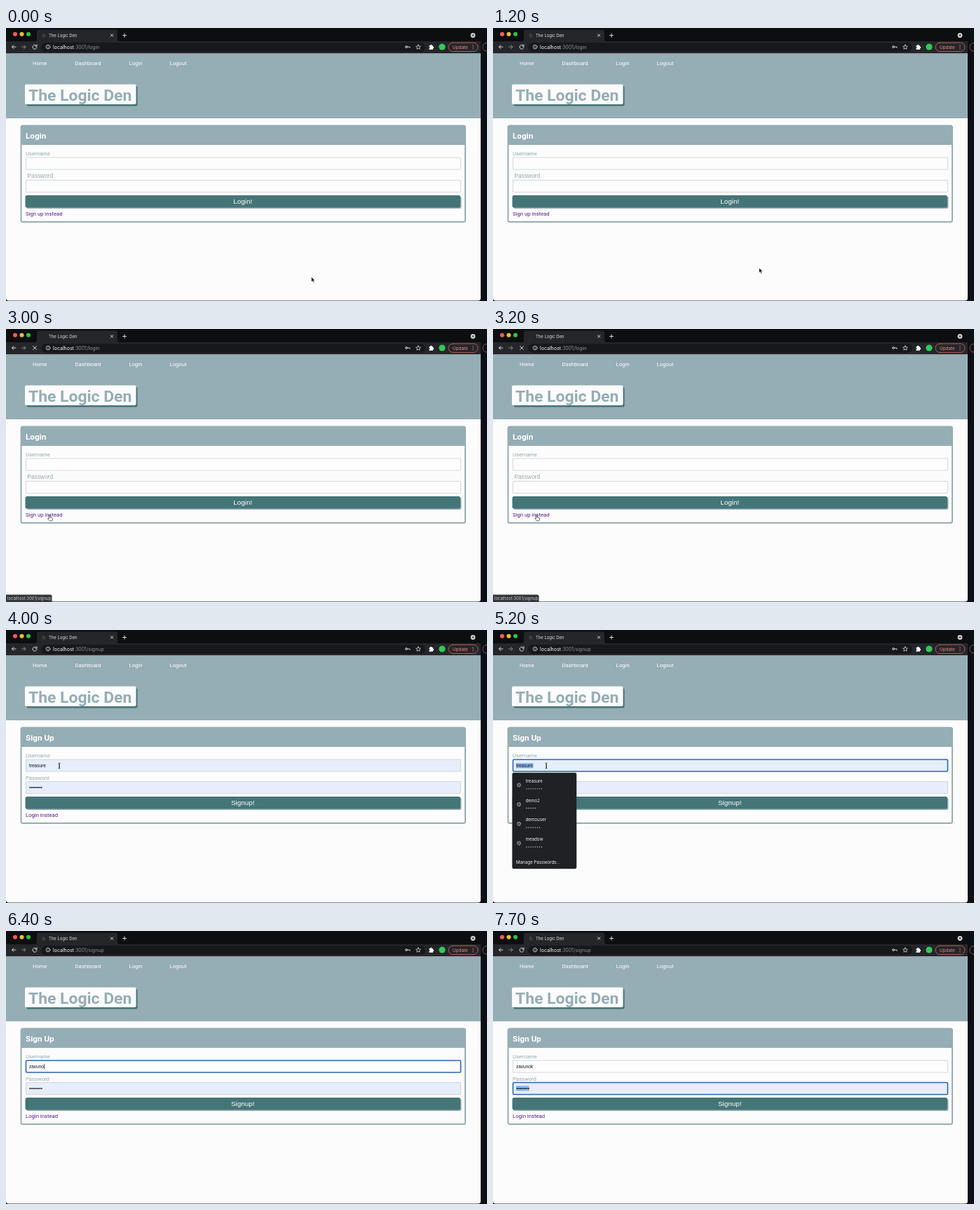
These frames come from a looping animation (686x390 px, 8000 ms). An HTML page:

```html
<!DOCTYPE html>
<html lang="en">
<head>
<meta charset="utf-8">
<title>The Logic Den</title>
<style>
  html, body { margin: 0; width: 100%; height: 100%; overflow: hidden; background: #0b0f15; }
  svg { display: block; width: 100%; height: 100%; }
  text { white-space: pre; }
  .ui { font-family: Inter, Roboto, sans-serif; }
  .page { font: 7.7px Roboto, "Open Sans", sans-serif; }
  .form { font: 6.5px "Liberation Sans", sans-serif; fill: #111; }
  .title { font-weight: 700; font-size: 22.9px; fill: #95adb5; }
  .heading { font-weight: 700; font-size: 11.7px; fill: #fff; }
  .label { fill: #93abb3; }
  .link { fill: #551a8b; }
  .button { font: 9.9px "Liberation Sans", sans-serif; fill: #fff; text-anchor: middle; }
  .icon { fill: none; stroke: #d5d7da; stroke-width: 1; stroke-linecap: round; stroke-linejoin: round; }
  .pointer { stroke: #fff; stroke-width: .6; fill: #000; }
</style>
</head>
<body>
<svg viewBox="0 0 686 390" preserveAspectRatio="none">
  <!-- browser window -->
  <rect width="677" height="40" fill="#0d0e10"/>
  <path d="M0 36H677V386Q677 389.500 673 389.500H4Q0 389.500 0 386Z" fill="#fcfcfc"/>
  <path d="M41 19Q44 19 44 16V5.500Q44 2.500 47 2.500H156Q159 2.500 159 5.500V16Q159 19 162 19H677V36.500H0V19Z" fill="#25262a"/>
  <rect x="50" y="21" width="548" height="13" rx="6.500" fill="#17181b"/>
  <circle cx="13" cy="8.800" r="3" fill="#fc5b57"/>
  <circle cx="22.500" cy="8.800" r="3" fill="#f5bd2f"/>
  <circle cx="32" cy="8.800" r="3" fill="#2ac840"/>
  <g class="ui">
    <text x="61" y="12.700" font-size="5.900" fill="#dfe1e5">The Logic Den</text>
    <text x="67" y="29.500" font-size="7" fill="#8f9398"><tspan fill="#fff">localhost</tspan>:3001/<tspan id="path"></tspan></text>
    <text x="637" y="29.600" font-size="6.300" fill="#f28b82">Update</text>
  </g>
  <path data-show="0-2900 3300-8000" d="M51.500 8h3l2 2v3.500h-5z" fill="#3b3d41"/>
  <g class="icon">
    <path d="M149.300 8.800l3.400 3.400m0-3.400l-3.400 3.400M166.500 10.500h5M169 8v5"/>
    <path d="M14 27H8.500m2.500-2.500L8.500 27l2.500 2.500"/>
    <path d="M22.500 27H28m-2.500-2.500L28 27l-2.500 2.500" stroke="#85888d"/>
    <path data-show="0-2900 3300-8000" d="M43.300 25.200A3 3 0 1 0 44 27.600M44 23.800v2.300h-2.300"/>
    <path data-show="2900-3300" d="M38.500 24.500l5 5m0-5l-5 5"/>
    <circle cx="60" cy="27" r="2.900" stroke-width=".8"/>
    <path d="M60 26.800v1.700M60 25.400v.1" stroke-width=".8"/>
    <circle cx="571" cy="27" r="1.400"/>
    <path d="M572.500 27h3.500v1.300"/>
    <path d="M588 23.800l1 2.200 2.400.2-1.800 1.600.5 2.400-2.100-1.300-2.100 1.300.5-2.400-1.800-1.600 2.400-.2z" stroke-width=".8"/>
    <rect x="631" y="21" width="42" height="12.500" rx="6.200" stroke="#c8605b" stroke-width=".9"/>
    <path d="M686 21.500h-1a5.800 5.800 0 0 0 0 11.500h1" stroke="#8b4845"/>
    <path d="M666 24.700v.1m0 2.400v.1m0 2.400v.1" stroke="#f28b82" stroke-width="1.200"/>
  </g>
  <path d="M603.500 25h1.500a1.200 1.200 0 0 1 2.400 0h1.600v1.700a1.200 1.200 0 0 1 0 2.400v1.700h-5.500v-2a1 1 0 0 0 0-2z" fill="#fff"/>
  <circle cx="622" cy="27" r="4.600" fill="#35c759"/>
  <circle cx="666" cy="10.500" r="3.400" fill="#c8cacd"/>
  <path d="M664.300 9.700h3.400l-1.700 2z" fill="#17181b"/>

  <!-- site header -->
  <rect y="36.500" width="677" height="92.500" fill="#95adb5"/>
  <g class="page" fill="#fff">
    <text x="38" y="52.500">Home</text>
    <text x="98.500" y="52.500">Dashboard</text>
    <text x="175.500" y="52.500">Login</text>
    <text x="233.500" y="52.500">Logout</text>
  </g>
  <rect x="29.500" y="83" width="158" height="28.500" rx="2" fill="#447577"/>
  <rect x="27" y="80.500" width="158.500" height="28.500" rx="2" fill="#fcfcfc"/>
  <text class="page title" x="32" y="103.500">The Logic Den</text>

  <!-- form card -->
  <rect id="card" x="21.500" y="139.500" width="633.500" rx="2.500" fill="#fcfcfc" stroke="#95adb5" stroke-width="2"/>
  <path d="M21 167V141.500Q21 139 23.500 139H653Q655.500 139 655.500 141.500V167Z" fill="#95adb5"/>
  <g class="page">
    <text class="heading" id="heading" x="28" y="157.600"></text>
    <text class="label" x="28" y="182">Username</text>
    <text class="label" id="passwordLabel" y="213.700">Password</text>
  </g>
  <rect id="userField" x="28.500" y="185" width="620" height="17"/>
  <rect id="passField" x="28.500" width="620" height="17"/>
  <rect data-show="5200-5700" x="33" y="190" width="24.500" height="7.500" fill="#8db9f3"/>
  <rect data-show="7200-8000" x="33" y="221" width="18.500" height="7.500" fill="#8db9f3"/>
  <text class="form" id="userText" x="33" y="195.800"></text>
  <rect id="caret" y="190" width=".7" height="7.200" fill="#111"/>
  <g id="passDots" data-show="3500-8000" fill="#111"></g>
  <g id="buttonGroup">
    <rect x="29" y="240.500" width="620.500" height="17.500" rx="2.500" fill="#95adb5"/>
    <rect id="buttonFace" x="27.500" y="239" width="620.500" height="17.500" rx="2.500"/>
    <text class="button" id="buttonText" x="337.700" y="251.300"></text>
    <text class="page link" id="switchLink" x="28" y="267.700"></text>
  </g>

  <!-- saved password menu -->
  <g data-show="5200-5700">
    <rect x="27.500" y="204" width="91.500" height="137" rx="2" fill="#202124" stroke="#3a3b3f" stroke-width=".4"/>
    <g id="menu" class="ui" font-size="6.200" fill="#f1f3f4">
      <text x="33" y="333.800">Manage Passwords...</text>
    </g>
  </g>

  <!-- status bubble -->
  <g data-show="2800-3700" class="ui">
    <path d="M0 379.500H63Q65.500 379.500 65.500 382V390H0Z" fill="#34363a"/>
    <text x="2" y="387" font-size="6" fill="#c5c8cc">localhost:3001/signup</text>
  </g>

  <g id="mouse">
    <path class="pointer" data-show="0-2300" d="M0 0V7.200L1.700 5.700 2.900 8.300 4.200 7.700 3 5.200H5.200Z"/>
    <path class="pointer" data-show="2300-3400" style="fill:#fff;stroke:#111" d="M-.8 0Q0-1 .7 0V3l3 .7q.8.300.7 1.300L3.700 8H.2L-2 5.200q-.3-1 .5-1L-.8 5Z"/>
    <path data-show="3400-5700" d="M-1.500-4Q0-4 0-3V3Q0 4-1.500 4M1.500-4Q0-4 0-3V3Q0 4 1.500 4" fill="none" stroke="#222" stroke-width=".8"/>
  </g>
</svg>
<script>
const DURATION = 8000;
const byId = id => document.getElementById(id);
const setAttrs = (el, attrs) => {
  for (const [name, value] of Object.entries(attrs)) el.setAttribute(name, value);
};
const dots = (count, x, y, gap, r) => Array.from({ length: count },
  (_, i) => `<circle cx="${x + i * gap}" cy="${y}" r="${r}"/>`).join('');

const accounts = [['treasure', 8], ['demo2', 5], ['demouser', 7], ['meadow', 8]];
byId('menu').innerHTML += accounts.map(([name, length], i) => {
  const y = 218 + i * 27.7;
  return `<text x="46.500" y="${y}">${name}</text>${dots(length, 48, y + 8.8, 3.05, .65)}
    <circle cx="37" cy="${y + 3.5}" r="2.600" fill="none" stroke="#a8abb0" stroke-width=".8"/>
    <path d="M35 ${y + 2.5}l2 1 .5 2.300M37.500 ${y + 1.2}l.5 1.500 1.300.6" fill="none" stroke="#a8abb0" stroke-width=".8"/>`;
}).join('');
byId('passDots').innerHTML = dots(8, 34.3, 225, 2.35, .95);

const timed = [...document.querySelectorAll('[data-show]')].map(el => ({
  el, spans: el.dataset.show.split(' ').map(span => span.split('-').map(Number))
}));

// Pointer stops: time, x, y
const stops = [[0, 435.5, 355.5], [1000, 435.5, 355.5], [1800, 80, 274], [2000, 64, 255],
  [2150, 64, 255], [2400, 62, 266], [3300, 62, 266], [3900, 76, 194], [8000, 76, 194]];
const typed = 'zavunok';
const keyTimes = [5700, 5900, 6100, 6200, 6300, 6400, 6800];

function pointerAt(t) {
  const i = stops.findIndex(stop => stop[0] > t);
  const [t0, x0, y0] = stops[i - 1], [t1, x1, y1] = stops[i];
  const p = (t - t0) / (t1 - t0), eased = p * p * (3 - 2 * p);
  return [x0 + (x1 - x0) * eased, y0 + (y1 - y0) * eased];
}

function styleField(id, focused, filled) {
  setAttrs(byId(id), {
    fill: filled ? '#e6eefc' : '#fdfdfd',
    stroke: focused ? '#2864b8' : '#c9cdd1',
    'stroke-width': focused ? 1.6 : .8,
    rx: focused ? 1.5 : .3
  });
}

function draw(t) {
  const signup = t >= 3300, autofilled = t >= 3500, typing = t >= keyTimes[0];
  const userFocused = t >= 5200 && t < 7200;

  for (const { el, spans } of timed) {
    el.style.display = spans.some(([from, to]) => t >= from && t < to) ? '' : 'none';
  }

  byId('path').textContent = signup ? 'signup' : 'login';
  byId('heading').textContent = signup ? 'Sign Up' : 'Login';
  byId('buttonText').textContent = signup ? 'Signup!' : 'Login!';
  byId('switchLink').textContent = signup ? 'Login instead' : 'Sign up instead';
  byId('card').setAttribute('height', signup ? 136.5 : 137.5);
  byId('passField').setAttribute('y', signup ? 216.5 : 217.5);
  byId('buttonGroup').setAttribute('transform', `translate(0 ${signup ? -1 : 0})`);
  byId('buttonFace').setAttribute('fill', t >= 1900 && t < 2250 ? '#0e2426' : '#447577');
  const label = byId('passwordLabel');
  label.setAttribute('x', signup ? 28 : 30.5);
  label.style.font = signup ? '' : '8.4px "Liberation Sans", sans-serif';

  styleField('userField', userFocused, autofilled && !typing);
  styleField('passField', t >= 7200, autofilled);

  const userText = byId('userText');
  const count = keyTimes.filter(time => t >= time).length;
  userText.textContent = typing ? typed.slice(0, count) : autofilled ? accounts[0][0] : '';
  const caret = byId('caret');
  caret.style.display = typing && userFocused ? '' : 'none';
  caret.setAttribute('x', 33.2 + userText.getComputedTextLength());

  byId('mouse').setAttribute('transform', `translate(${pointerAt(t)})`);
}

function tick(now) {
  draw((now - start) % DURATION);
  requestAnimationFrame(tick);
}
const start = performance.now();
draw(0);
requestAnimationFrame(now => tick(Math.max(now, start)));
</script>
</body>
</html>
```
